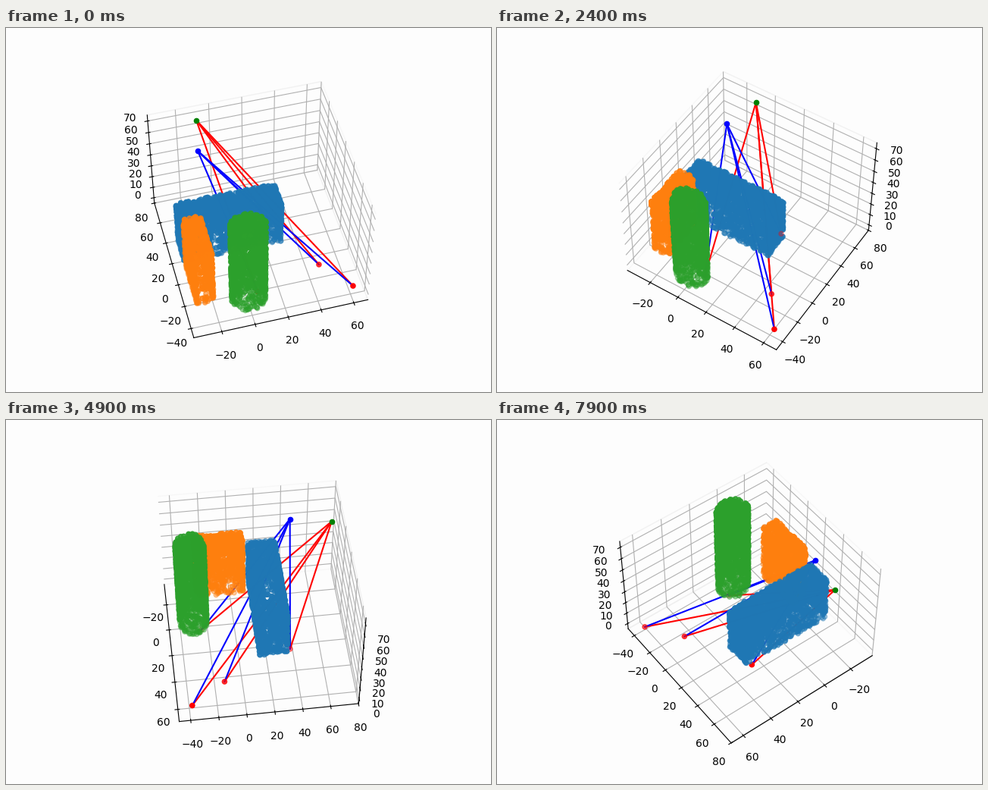
A matplotlib script for the animation above (8000 ms loop, 640x480 px).

```python
import numpy as np
import matplotlib.pyplot as plt
from matplotlib.animation import FuncAnimation

FRAMES = 80
INTERVAL = 100
ELEV, AZIM, STEP = 50, -105, 2
MARGIN = 1.1 * 25 / 24

rng = np.random.default_rng(4)


def box(n, xs, ys, height):
    """Random points on the four walls and the lid of a box."""
    (x0, x1), (y0, y1) = xs, ys
    w, d = x1 - x0, y1 - y0
    areas = np.array([w * height, w * height, d * height, d * height, w * d])
    face = rng.choice(5, n, p=areas / areas.sum())
    x = rng.uniform(x0, x1, n)
    y = rng.uniform(y0, y1, n)
    z = rng.uniform(0, height, n)
    y[face == 0], y[face == 1] = y0, y1
    x[face == 2], x[face == 3] = x0, x1
    z[face == 4] = height
    return x, y, z


def cylinder(n, cx, cy, radius, height):
    """Random points on the wall and the lid of an upright cylinder."""
    t = rng.uniform(0, 2 * np.pi, n)
    z = rng.uniform(0, height, n)
    r = np.full(n, float(radius))
    lid = rng.random(n) < radius / (radius + 2 * height)
    r[lid] *= np.sqrt(rng.random(lid.sum()))
    z[lid] = height
    return cx + r * np.cos(t), cy + r * np.sin(t), z


def padded(lo, hi):
    mid, half = (lo + hi) / 2, (hi - lo) / 2 * MARGIN
    return mid - half, mid + half


PAPER = "#fdfdfd"
fig = plt.figure(figsize=(6.4, 4.8), dpi=100, facecolor=PAPER)
ax = fig.add_subplot(projection="3d", facecolor=PAPER)

ax.scatter(*box(1950, (-30, 30), (15, 35), 35), color="C0")
ax.scatter(*box(1050, (-30, -20), (-25, 10), 45), color="C1")
ax.scatter(*cylinder(1300, 0, -30, 10, 70), color="C2")

hits = np.array([(61.9, -37.9, 0), (47, -13, 0), (27.5, 37.6, 0), (6.5, -25, 0)])
eyes = [((-9.2, 72, 70), "g", "r"), ((-14, 43, 70), "b", "b")]
ax.scatter(*hits.T, color="r")
for eye, dot, ray in eyes:
    ax.scatter(*eye, color=dot)
    for hit in hits:
        ax.plot(*zip(eye, hit), color=ray)

ax.set_xlim(*padded(-30, 62))
ax.set_ylim(*padded(-40, 72))
ax.set_zlim(*padded(0, 70))
ax.set_xticks(range(-20, 61, 20))
ax.set_yticks(range(-40, 81, 20))
ax.set_zticks(range(0, 71, 10))
for axis in (ax.xaxis, ax.yaxis, ax.zaxis):
    axis.pane.set_fill(False)


def update(i):
    ax.view_init(elev=ELEV, azim=AZIM + STEP * i)
    return []


anim = FuncAnimation(fig, update, frames=FRAMES, interval=INTERVAL,
                     repeat=True, repeat_delay=0, blit=False)
plt.show()
```
